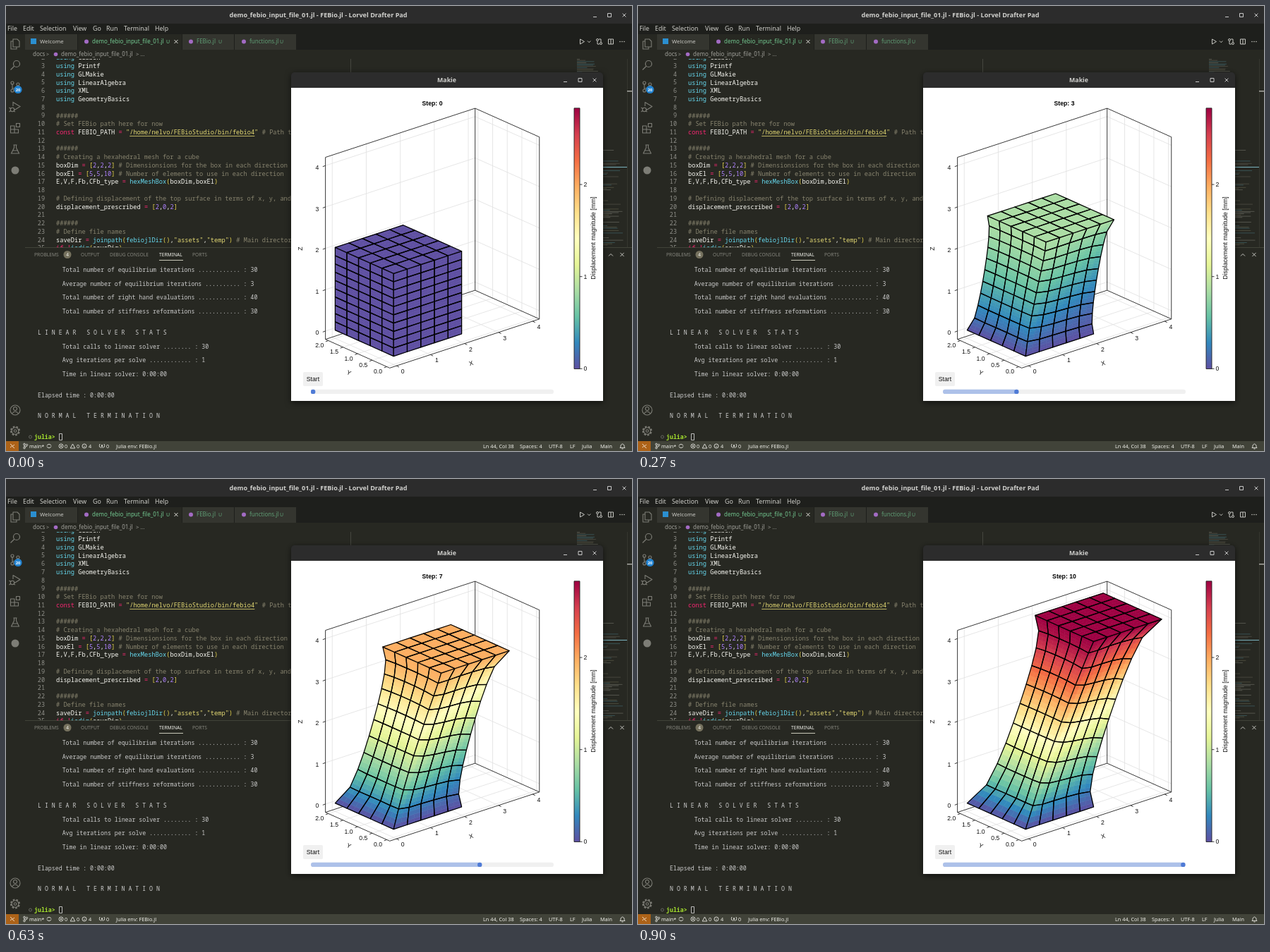
An HTML page with a canvas for the animation above (990 ms loop, 887 by 631 pixels).

```html
<!DOCTYPE html>
<html lang="en">
<head>
<meta charset="utf-8">
<title>Hexahedral mesh simulation</title>
<style>
html, body { margin: 0; width: 100%; height: 100%; overflow: hidden; background: #272822; }
canvas { display: block; width: 887px; height: 631px; }
</style>
</head>
<body>
<canvas id="stage" width="887" height="631"></canvas>
<script>
const g = document.getElementById('stage').getContext('2d');
const UI = '"Noto Sans", sans-serif', MONO = '"Noto Sans Mono", monospace', PLOT = '"Liberation Sans", Arial, sans-serif';
const STEP_MS = 90, STEPS = 11;
const SPECTRAL = ['5e4fa2', '3288bd', '66c2a5', 'abdda4', 'e6f598', 'ffffbf', 'fee08b', 'fdae61', 'f46d43', 'd53e4f', '9e0142'];

// ---- drawing helpers ----
function rect(x, y, w, h, color) { g.fillStyle = color; g.fillRect(x, y, w, h); }

function pill(x, y, w, h, r, color) {
  g.fillStyle = color;
  g.beginPath();
  g.roundRect(x, y, w, h, r);
  g.fill();
}

function dot(x, y, r, color) {
  g.fillStyle = color;
  g.beginPath();
  g.arc(x, y, r, 0, 2 * Math.PI);
  g.fill();
}

function icon(path, color = '#c5c5c0', width = 1) {
  g.strokeStyle = color;
  g.lineWidth = width;
  g.stroke(new Path2D(path));
}

const ring = (x, y, r) => `M${x - r} ${y}a${r} ${r} 0 1 0 ${2 * r} 0a${r} ${r} 0 1 0 ${-2 * r} 0`;
const box = (x, y, w, h) => `M${x} ${y}h${w}v${h}h${-w}z`;
const cross = (x, y, r) => `M${x - r} ${y - r}l${2 * r} ${2 * r}m0 ${-2 * r}l${-2 * r} ${2 * r}`;

// y is the middle of the capitals
function text(str, x, y, size, color, family = UI, { align = 'left', weight = 400, turn = 0 } = {}) {
  g.save();
  g.translate(x, y);
  g.rotate(turn);
  g.font = `${weight} ${size}px ${family}`;
  g.textAlign = align;
  g.fillStyle = color;
  g.fillText(str, 0, size * 0.35);
  g.restore();
}

function line(color, width, ...points) {
  g.strokeStyle = color;
  g.lineWidth = width;
  g.beginPath();
  points.forEach(p => g.lineTo(...p));
  g.stroke();
}

function spectral(v) {
  const p = Math.max(0, Math.min(1, v)) * 10, i = Math.min(9, Math.floor(p));
  const channel = (hex, k) => parseInt(hex.substr(2 * k, 2), 16);
  const mix = k => Math.round(channel(SPECTRAL[i], k) + (p - i) * (channel(SPECTRAL[i + 1], k) - channel(SPECTRAL[i], k)));
  return `rgb(${mix(0)},${mix(1)},${mix(2)})`;
}

// ---- editor ----
const CODE = `using Gibbon
using Printf
using GLMakie
using LinearAlgebra
using XML
using GeometryBasics

######
# Set FEBio path here for now
const FEBIO_PATH = "/home/nelvo/FEBioStudio/bin/febio4" # Path to FEBio

######
# Creating a hexahedral mesh for a cube
boxDim = [2,2,2] # Dimensionsions for the box in each direction
boxEl = [5,5,10] # Number of elements to use in each direction
E,V,F,Fb,CFb_type = hexMeshBox(boxDim,boxEl)

# Defining displacement of the top surface in terms of x, y, and z
displacement_prescribed = [2,0,2]

######
# Define file names
saveDir = joinpath(febiojlDir(),"assets","temp") # Main directory
if !isdir(saveDir)`.split('\n');
const TOKEN = /(#.*)|("[^"]*")|(\b(?:using)\b|\w+(?=\())|(\b(?:const|if)\b|[=!])|(\b\d+)|([\[\]()])|[\w]+|./g;
const TOKEN_COLORS = ['#88846f', '#e6db74', '#66d9ef', '#f92672', '#ae81ff', '#e8d44d'];

function drawCode() {
  const charW = 5.21;
  g.save();
  g.beginPath();
  g.rect(27, 75, 781, 267);
  g.clip();
  rect(488, 75, 1, 267, '#45463f');
  CODE.forEach((src, i) => {
    const y = 73.3 + i * 11.74;
    text(i + 2, 55, y, 8.5, '#90908a', MONO, { align: 'right' });
    for (const m of src.matchAll(TOKEN)) {
      const kind = m.slice(1).findIndex(Boolean), x = 71 + m.index * charW;
      text(m[0], x, y, 8.68, TOKEN_COLORS[kind] || '#f8f8f2', MONO);
      if (m[0].startsWith('"/')) rect(x + charW, y + 5, (m[0].length - 2) * charW, 0.8, '#e6db74');
    }
  });
  g.restore();
}

function drawMinimap() {
  let seed = 7;
  const random = () => (seed = seed * 16807 % 2147483647) / 2147483647;
  g.globalAlpha = 0.55;
  for (let y = 75; y < 340; y += 1.7) {
    const long = y > 200 && random() < 0.4;
    const w = long ? 42 + random() * 25 : 4 + random() * 28;
    rect(809, y, w, 0.8, ['#6d6b5c', '#77735a', '#4d8490', '#8a8a80'][Math.floor(random() * 4)]);
  }
  g.globalAlpha = 1;
  rect(846, 228, 34, 1, '#79b3be');
  rect(880, 75, 1, 267, '#35362f');
  rect(880, 120, 7, 1.5, '#a8a8a2');
}

function drawEditor() {
  rect(0, 0, 887, 631, '#272822');
  drawCode();
  drawMinimap();

  rect(0, 0, 887, 25, '#2c2c2c');
  text('demo_febio_input_file_01.jl - FEBio.jl - Lorvel Drafter Pad', 442.5, 13, 9.1, '#d0d0cd', UI, { align: 'center', weight: 600 });
  icon('M832 15.5h5' + box(852.5, 10.5, 5, 5) + cross(876, 13, 2.4), '#c8c8c8');

  rect(0, 25, 887, 15, '#1e1f1c');
  [['File', 2], ['Edit', 24], ['Selection', 48], ['View', 95], ['Go', 123], ['Run', 142], ['Terminal', 167], ['Help', 211]]
    .forEach(([label, x]) => text(label, x, 32.3, 8.8, '#d0d0cb'));

  rect(27, 40, 860, 22, '#1e1f1c');
  rect(27, 40, 74, 22, '#34352f');
  rect(102, 40, 147, 22, '#272822');
  rect(250, 40, 73, 22, '#34352f');
  rect(324, 40, 87, 22, '#34352f');
  rect(35, 46, 8, 8, '#2b8fd0');
  text('Welcome', 48, 50.5, 7.8, '#ccccc7');
  [['demo_febio_input_file_01.jl', 114, 122, 227], ['FEBio.jl', 262, 270, 301], ['functions.jl', 337, 345, 388]].forEach(([name, dx, x, u], i) => {
    dot(dx, 50.5, 3, '#a36bc4');
    text(name, x, 50.5, 8, i ? '#5f9c74' : '#73c991');
    text('U', u, 50.5, 7, i ? '#5f9c74' : '#73c991');
  });
  icon(cross(241, 50.5, 2.5), '#e0e0da');
  icon('M813.5 47v7l6-3.5zM824 49.5l2.2 2.2l2.2-2.2' + ring(838, 48, 1.5) + ring(843, 53, 1.5) +
    'M838 50v4h3M843 51v-4h-3' + box(853.5, 47, 7, 7) + 'M857 47v7');
  [870, 873, 876].forEach(x => dot(x, 50.5, 0.8, '#c5c5c0'));

  text('docs', 38, 68.5, 8, '#a0a09a');
  text('>', 57, 68.5, 7, '#a0a09a');
  dot(70.5, 68.5, 2.8, '#a36bc4');
  text('demo_febio_input_file_01.jl', 78, 68.5, 8, '#a0a09a');
  text('> ...', 184, 68.5, 7.6, '#a0a09a');
}

function drawActivityBar() {
  const gray = '#7d7d76';
  icon('M10 47h6l3 3v8h-9zM10 50h-3v11h8v-3', gray, 1.1);
  icon(ring(15, 82, 4.5) + 'M11.5 85.5l-5 5', gray, 1.2);
  icon(ring(9, 109, 2) + ring(17, 111, 2) + ring(9, 120, 2) + 'M9 111v7M17 113q0 3-8 4', gray, 1.1);
  dot(17, 118.5, 5.6, '#2384d2');
  text('20', 17, 118.5, 5.8, '#fff', UI, { align: 'center', weight: 700 });
  icon('M10 142v-5.500l10 6l-8 5' + ring(9, 147, 2.7) + 'M4.500 144l2 1.500M4.500 150l2-1.500M11 149l2 1', gray, 1.1);
  icon(box(6.5, 170, 5.5, 5) + box(6.5, 175, 5.5, 5) + box(12, 175, 5.5, 5) + box(14.5, 166.5, 5, 5), gray, 1.1);
  icon('M10.500 197h5M11.500 197v4l-4 8h11l-4-8v-4M9.500 205h7', gray, 1.1);
  dot(13, 233, 5.5, gray);
  icon(ring(13, 573, 7) + ring(13, 571, 2.5) + 'M8.500 578q4.500-6 9 0', gray, 1.1);
  g.setLineDash([2.6, 2.1]);
  icon(ring(13, 602.5, 6), gray, 2);
  g.setLineDash([]);
  icon(ring(13, 602.5, 4.8) + ring(13, 602.5, 1.8), gray, 1.1);
}

const TERMINAL = [
  [7, 'Total number of equilibrium iterations ............ : 30', 0],
  [7, 'Average number of equilibrium iterations .......... : 3', 2],
  [7, 'Total number of right hand evaluations ............ : 40', 4],
  [7, 'Total number of stiffness reformations ............ : 30', 6],
  [0, 'L I N E A R   S O L V E R   S T A T S', 9],
  [7, 'Total calls to linear solver ........ : 30', 11],
  [7, 'Avg iterations per solve ............ : 1', 13],
  [7, 'Time in linear solver: 0:00:00', 15],
  [0, 'Elapsed time : 0:00:00', 18],
  [0, 'N O R M A L   T E R M I N A T I O N', 21]
];

function drawPanel() {
  rect(27, 342, 860, 275, '#272822');
  rect(27, 342, 860, 1, '#414339');
  [['PROBLEMS', 40], ['OUTPUT', 106], ['DEBUG CONSOLE', 147], ['TERMINAL', 217], ['PORTS', 264]]
    .forEach(([label, x]) => text(label, x, 352.5, 6.7, label === 'TERMINAL' ? '#f0f0ea' : '#86867e'));
  rect(217, 360, 34, 1, '#c8c8b8');
  dot(87, 352.5, 5.5, '#75715e');
  text('4', 87, 352.5, 6.5, '#f8f8f2', UI, { align: 'center' });
  icon('M854 354.500l3-3l3 3' + cross(873, 352.5, 2.6));

  TERMINAL.forEach(([indent, str, row]) => text(str, 45 + indent * 4.95, 374 + row * 9.88, 8.24, '#cccccc', MONO));
  icon(ring(34.5, 611, 2), '#75756f', 0.8);
  text('julia>', 40, 611, 8.24, '#a6e22e', MONO, { weight: 700 });
  icon(box(75.5, 606.5, 4, 9), '#cccccc', 0.9);

  rect(0, 617, 887, 14, '#414339');
  rect(0, 617, 18, 14, '#ac6218');
  icon('M6 621l3 2.500l-3 2.500M12 622l-3 2.500l3 2.500', '#f5e5d0', 0.9);
  icon(ring(26, 621.5, 1.3) + ring(26, 626.5, 1.3) + ring(29.5, 622.5, 1.2) + 'M26 623v2M29.500 624q0 1-3 1.300' +
    'M58 623.500a3.200 3.200 0 0 1 6 0M64 624.500a3.200 3.200 0 0 1-6 0' + ring(78, 624, 3) + cross(78, 624, 1.2) +
    'M94.500 621l3.300 6h-6.600z' + ring(111, 624, 3) + 'M111 623.500v2.200' +
    'M133 621q-1.500 2.500 0 5M139 621q1.500 2.500 0 5M134.500 627l1.500-5l1.500 5' +
    'M870 626.500h7l-1-1.500v-2q-2.500-4-5 0v2zM872.500 628h2', '#e5e5df', 0.9);
  [['main*', 33], ['0', 83], ['0', 100], ['4', 117], ['0', 142], ['Julia env: FEBio.jl', 156], ['Ln 44, Col 38', 676],
    ['Spaces: 4', 728], ['UTF-8', 769], ['LF', 799], ['Julia', 816], ['Main', 842]]
    .forEach(([label, x]) => text(label, x, 624, 7.3, '#f0f0ea'));
}

// ---- elastic block: 5 x 5 x 10 trilinear bricks, neo-Hookean, Poisson ratio 0.4 ----
const MU = 1, LAMBDA = 4, CELL = [0.4, 0.4, 0.2], LAYER = 36 * 3;
const CORNERS = Array.from({ length: 8 }, (_, c) => [c & 1, c >> 1 & 1, c >> 2]);
const offset = (i, j, k) => 3 * (k * 36 + j * 6 + i);
const rest = new Float64Array(11 * LAYER), bricks = [];
for (let k = 0; k <= 10; k++) for (let j = 0; j <= 5; j++) for (let i = 0; i <= 5; i++) {
  rest.set([i * CELL[0], j * CELL[1], k * CELL[2]], offset(i, j, k));
  if (i < 5 && j < 5 && k < 10) bricks.push(CORNERS.map(([a, b, c]) => offset(i + a, j + b, k + c)));
}

// Shape function gradients at the eight Gauss points
const gradients = CORNERS.map(q => Float64Array.from(CORNERS.flatMap(c => CELL.map((h, a) =>
  CELL.reduce((product, _, b) => {
    const t = 0.5 + (q[b] - 0.5) / Math.sqrt(3);
    return product * (a === b ? (c[b] ? 1 : -1) / h : (c[b] ? t : 1 - t));
  }, 1)))));

function addForces(x, force) {
  const F = new Float64Array(9), C = new Float64Array(9);
  force.fill(0);
  for (const brick of bricks) for (const B of gradients) {
    F.fill(0);
    for (let n = 0; n < 8; n++) for (let a = 0; a < 3; a++) {
      const v = x[brick[n] + a];
      for (let b = 0; b < 3; b++) F[3 * a + b] += v * B[3 * n + b];
    }
    for (let a = 0; a < 3; a++) for (let b = 0; b < 3; b++) {
      const a1 = 3 * ((a + 1) % 3), a2 = 3 * ((a + 2) % 3), b1 = (b + 1) % 3, b2 = (b + 2) % 3;
      C[3 * a + b] = F[a1 + b1] * F[a2 + b2] - F[a1 + b2] * F[a2 + b1];
    }
    const J = Math.max(0.05, F[0] * C[0] + F[1] * C[1] + F[2] * C[2]);
    const pressure = (LAMBDA * Math.log(J) - MU) / J;
    for (let m = 0; m < 9; m++) C[m] = MU * F[m] + pressure * C[m];
    for (let n = 0; n < 8; n++) for (let a = 0; a < 3; a++) {
      force[brick[n] + a] += C[3 * a] * B[3 * n] + C[3 * a + 1] * B[3 * n + 1] + C[3 * a + 2] * B[3 * n + 2];
    }
  }
}

// Equilibrium with the bottom fixed and the top moved by step/10 of [2,0,2]
const shapes = [rest];
function shape(step) {
  if (shapes[step]) return shapes[step];
  const last = shape(step - 1);
  const x = rest.map((r, i) => step > 1
    ? r + (last[i] - r) * step / (step - 1)
    : r + (i % 3 === 1 ? 0 : 0.1 * rest[i - i % 3 + 2]));
  const force = new Float64Array(x.length), velocity = new Float64Array(x.length);
  for (let pass = 0; pass < 50; pass++) {
    addForces(x, force);
    for (let i = LAYER; i < 10 * LAYER; i++) {
      velocity[i] = 0.85 * velocity[i] - 0.00045 * force[i];
      x[i] += velocity[i];
    }
  }
  return shapes[step] = x;
}

// ---- plot window ----
const project = (x, y, z) => [549.2 + 48.2 * x - 41.4 * y, 496.6 - 15.8 * x - 18.5 * y - 58.65 * z];
const LOW = -0.2, HIGH = 4.2, Y_LOW = -0.1, Y_HIGH = 2.1;

function drawAxes() {
  const label = (str, [x, y], align = 'center') => text(str, x, y, 8.7, '#111', PLOT, { align });
  const shift = ([x, y], dx, dy) => [x + dx, y + dy];
  const grid = (...corners) => line('#e0e0e0', 0.8, ...corners.map(c => project(...c)));
  const spine = (...corners) => line('#222', 0.9, ...corners.map(c => project(...c)));
  for (let i = 0; i < 5; i++) {
    const h = i / 2;
    grid([i, Y_LOW, LOW], [i, Y_HIGH, LOW], [i, Y_HIGH, HIGH]);
    grid([LOW, h, LOW], [HIGH, h, LOW], [HIGH, h, HIGH]);
    grid([LOW, Y_HIGH, i], [HIGH, Y_HIGH, i], [HIGH, Y_LOW, i]);
    const tx = project(i, Y_LOW, LOW), ty = project(LOW, h, LOW), tz = project(LOW, Y_HIGH, i);
    line('#222', 0.9, tx, shift(tx, 3.6, 1.8));
    line('#222', 0.9, ty, shift(ty, -3.8, 1.4));
    line('#222', 0.9, tz, shift(tz, -3.8, 1.4));
    label(i, shift(tx, 8.8, 8));
    label(h.toFixed(1), shift(ty, -12.5, 6.5));
    label(i, shift(tz, -11.7, 2.5));
  }
  spine([LOW, Y_LOW, LOW], [HIGH, Y_LOW, LOW], [HIGH, Y_HIGH, LOW], [LOW, Y_HIGH, LOW], [LOW, Y_LOW, LOW]);
  spine([LOW, Y_HIGH, LOW], [LOW, Y_HIGH, HIGH], [HIGH, Y_HIGH, HIGH], [HIGH, Y_LOW, HIGH], [HIGH, Y_LOW, LOW]);
  spine([HIGH, Y_HIGH, LOW], [HIGH, Y_HIGH, HIGH]);
  text('X', 659, 506.5, 8.7, '#111', PLOT, { align: 'center', turn: -0.32 });
  text('Y', 486, 520, 8.7, '#111', PLOT, { align: 'center', turn: 0.42 });
  text('Z', 417, 344, 8.7, '#111', PLOT, { align: 'center', turn: -Math.PI / 2 });
}

function drawFace(cols, rows, at) {
  const lerp = (a, b, t) => a.map((v, k) => v + (b[k] - v) * t);
  const quad = pts => {
    g.beginPath();
    pts.forEach(p => g.lineTo(p[0], p[1]));
    g.closePath();
  };
  const NU = 2, NV = 4, outlines = [];
  g.lineWidth = 0.6;
  for (let i = 0; i < cols; i++) for (let j = 0; j < rows; j++) {
    const [a, b, c, d] = [at(i, j), at(i + 1, j), at(i + 1, j + 1), at(i, j + 1)];
    const inner = (u, v) => lerp(lerp(a, b, u / NU), lerp(d, c, u / NU), v / NV);
    for (let u = 0; u < NU; u++) for (let v = 0; v < NV; v++) {
      g.fillStyle = g.strokeStyle = spectral(inner(u + 0.5, v + 0.5)[2]);
      quad([inner(u, v), inner(u + 1, v), inner(u + 1, v + 1), inner(u, v + 1)]);
      g.fill();
      g.stroke();
    }
    outlines.push([a, b, c, d]);
  }
  g.strokeStyle = '#000';
  g.lineWidth = 1.25;
  g.lineJoin = 'round';
  outlines.forEach(o => { quad(o); g.stroke(); });
}

function drawMesh(step) {
  const points = shape(step);
  // [screen x, screen y, relative displacement]
  const node = (i, j, k) => {
    const o = offset(i, j, k), [x, y, z] = points.subarray(o, o + 3);
    return [...project(x, y, z), Math.hypot(x - rest[o], y - rest[o + 1], z - rest[o + 2]) / Math.sqrt(8)];
  };
  drawFace(5, 10, (j, k) => node(0, j, k));
  drawFace(5, 10, (i, k) => node(i, 0, k));
  drawFace(5, 5, (i, j) => node(i, j, 10));
}

function drawColorbar() {
  const ramp = g.createLinearGradient(0, 514.5, 0, 145);
  SPECTRAL.forEach((c, i) => ramp.addColorStop(i / 10, '#' + c));
  rect(805, 145, 8, 369.5, ramp);
  icon(box(805, 144.8, 8, 369.7), '#222', 0.9);
  for (let v = 0; v < 3; v++) {
    const y = 514.3 - v * 130.6;
    line('#222', 0.9, [813, y], [816.5, y]);
    text(v, 818.5, y, 8.7, '#111', PLOT);
  }
  text('Displacement magnitude [mm]', 831.5, 329, 8.7, '#111', PLOT, { align: 'center', turn: -Math.PI / 2 });
}

function drawWindow(step) {
  g.save();
  g.shadowColor = 'rgba(0,0,0,.6)';
  g.shadowBlur = 9;
  g.shadowOffsetY = 2;
  pill(404, 94, 442, 466, [5, 5, 0, 0], '#2c2c2c');
  g.restore();
  text('Makie', 624.5, 105, 8.8, '#d0d0cd', UI, { align: 'center', weight: 600 });
  icon('M790 107.500h5' + box(811, 102.5, 5, 5) + cross(834, 105, 2.4), '#c8c8c8');
  rect(404, 116, 442, 444, '#fff');

  text('Step: ' + step, 604, 137.5, 8.7, '#000', PLOT, { align: 'center', weight: 700 });
  drawAxes();
  drawMesh(step);
  drawColorbar();

  pill(421, 519, 28, 20, 2, '#f0f0f0');
  text('Start', 435, 529, 8.7, '#111', PLOT, { align: 'center' });
  const knob = 435.2 + step * 33.72;
  pill(432, 543.8, 344, 6.2, 3.1, '#f0f0f0');
  pill(432, 543.8, knob - 432, 6.2, 3.1, '#adc1e9');
  dot(knob, 546.9, 3.2, '#4f7bd6');
}

let shown = -1;
function tick(now) {
  const step = Math.floor(now / STEP_MS) % STEPS;
  if (step !== shown) {
    shown = step;
    drawEditor();
    drawActivityBar();
    drawPanel();
    drawWindow(step);
  }
  requestAnimationFrame(tick);
}
tick(performance.now());
</script>
</body>
</html>
```
